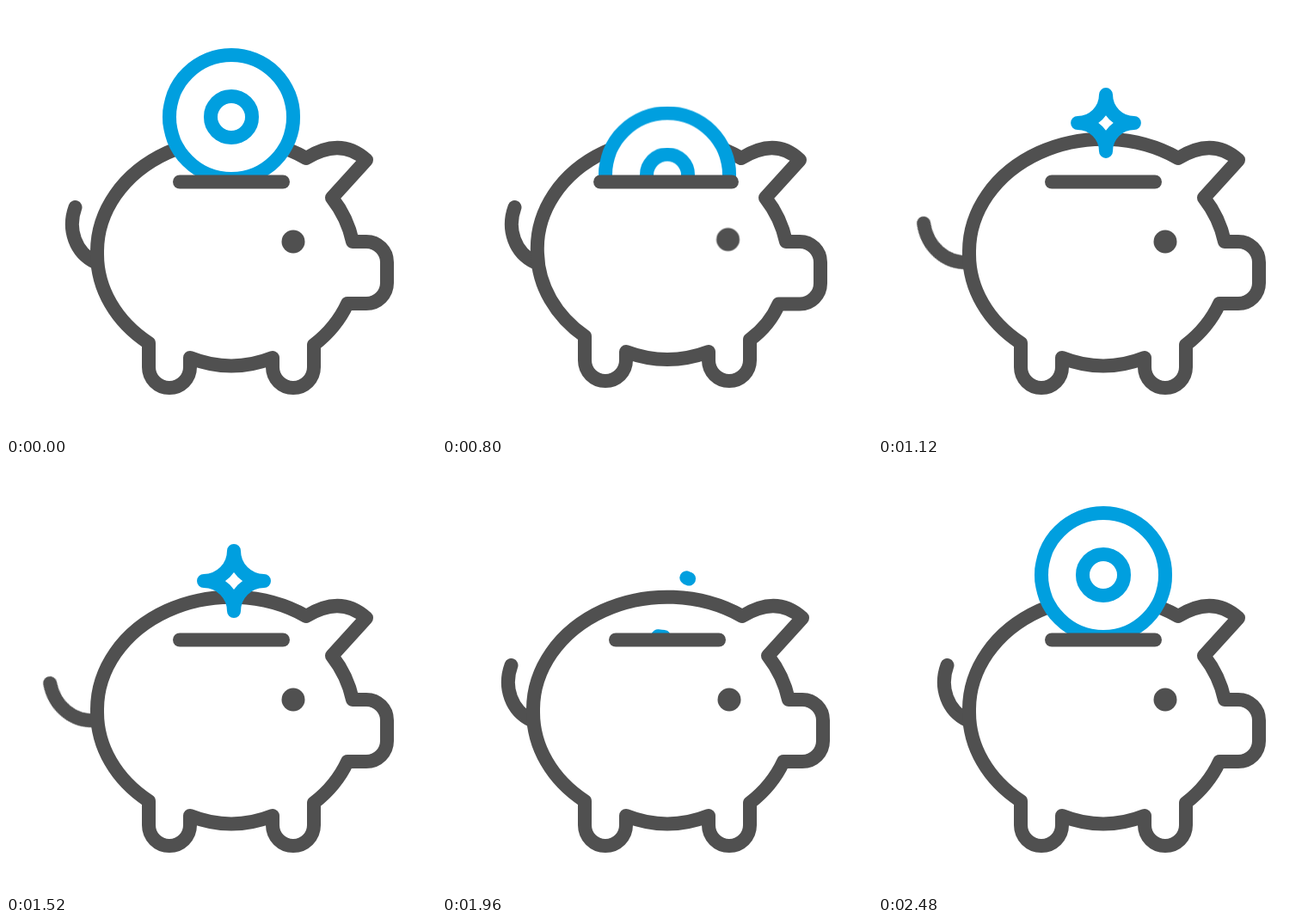
Animation of 500 by 500 pixels, one loop 3000 ms. Source, as an HTML page without scripts:

```html
<!DOCTYPE html>
<html lang="en">
<head>
<meta charset="utf-8">
<title>Piggy bank</title>
<style>
  html, body { margin: 0; width: 100%; height: 100%; overflow: hidden; background: #fff; }
  svg { display: block; width: 100vw; height: 100vh; }

  .line { fill: none; stroke: #505050; stroke-width: 16; stroke-linecap: round; stroke-linejoin: round; }
  .blue { fill: none; stroke: #009fdf; stroke-width: 16; stroke-linecap: round; stroke-linejoin: round; }
  .line, .blue, .eye, .move { animation: 3s ease-in-out infinite; }

  .body  { animation-name: gulp; }
  .slot  { animation-name: widen; }
  .eye   { fill: #505050; animation-name: eye; }
  .tail-shift { animation-name: tail-shift; }
  .tail  { transform-origin: 104px 298px; animation-name: wag; }
  .coin  { animation-name: drop; }
  .fill  { animation-name: fill; }
  .rim   { animation-name: draw-rim; }
  .hub   { animation-name: draw-hub; }
  .spark { animation-name: spark; }

  @keyframes gulp {
    0%, 21%, 36.5%, 100% {
      d: path("M358 394Q384 374 397 346H419A24 24 0 0 0 443 322V298A24 24 0 0 0 419 274H403Q397 246 379 223L419 179Q389 152 349 177A156 131 0 0 0 106 288A156 131 0 0 0 166 392V420A24 24 0 0 0 214 420V409Q262 428 310 409V420A24 24 0 0 0 358 420Z");
    }
    27%, 28% {
      d: path("M358 388Q381 371 391.5 346.5H416A24 24 0 0 0 440 322.5V298A24 24 0 0 0 416 274H400Q394 246 376 223L416 179Q388 152 348 177A151 128 0 0 0 111 288A151 128 0 0 0 166 384V412A24 24 0 0 0 214 412V402Q262 420 310 402V412A24 24 0 0 0 358 412Z");
    }
  }
  @keyframes widen {
    0%, 21%, 36.5%, 100% { d: path("M202 204.5H322"); }
    27%, 28% { d: path("M184 204.5H337"); }
  }
  @keyframes eye {
    0%, 21%, 36.5%, 100% { transform: none; }
    27%, 28% { transform: translate(-1.5px, -2.5px); }
  }
  @keyframes tail-shift {
    0%, 21%, 36.5%, 100% { transform: none; }
    27%, 28% { transform: translate(4px, 0); }
  }
  @keyframes wag {
    0%, 31.3% { transform: rotate(0deg); }
    39.3%, 48% { transform: rotate(-32deg); animation-timing-function: ease-in; }
    57.3% { transform: rotate(-21deg); animation-timing-function: ease-out; }
    65%, 100% { transform: rotate(0deg); }
  }
  @keyframes drop {
    0%, 19.2% { transform: none; }
    35.7% { transform: translate(0, 160px); }
    36%, 100% { transform: none; }
  }
  @keyframes fill {
    0%, 35.7% { transform: none; }
    35.71%, 65.3% { transform: translate(0, 148px); animation-timing-function: linear; }
    76% { transform: translate(0, 72px); animation-timing-function: ease-out; }
    82.6%, 100% { transform: none; }
  }
  /* Both ends of each stroke travel from the bottom to meet at the top. */
  @keyframes draw-rim {
    0%, 35.7% { opacity: 1; stroke-dasharray: 100 100; stroke-dashoffset: 0; }
    35.71%, 64.5% { opacity: 0; stroke-dasharray: 0 100; stroke-dashoffset: -51.6; }
    64.51% { opacity: 1; stroke-dasharray: 0 100; stroke-dashoffset: -51.6; animation-timing-function: linear; }
    65.33% { opacity: 1; stroke-dasharray: 1.5 100; stroke-dashoffset: -50.9; animation-timing-function: ease-in; }
    76% { opacity: 1; stroke-dasharray: 52 100; stroke-dashoffset: -20; animation-timing-function: ease-out; }
    82.6%, 100% { opacity: 1; stroke-dasharray: 100 100; stroke-dashoffset: 0; }
  }
  @keyframes draw-hub {
    0%, 35.7% { opacity: 1; stroke-dasharray: 100 100; stroke-dashoffset: 0; }
    35.71%, 68% { opacity: 0; stroke-dasharray: 0 100; stroke-dashoffset: -50; }
    68.01% { opacity: 1; stroke-dasharray: 0 100; stroke-dashoffset: -50; }
    82%, 100% { opacity: 1; stroke-dasharray: 100 100; stroke-dashoffset: 0; }
  }
  @keyframes spark {
    0%, 32% {
      opacity: 0; stroke-dasharray: 100 100; stroke-dashoffset: 0;
      d: path("M264 136A1 1 0 0 1 265 137A1 1 0 0 1 266 136A1 1 0 0 1 265 135A1 1 0 0 1 264 136Z");
    }
    32.01% {
      opacity: 1; stroke-dasharray: 100 100; stroke-dashoffset: 0;
      d: path("M264 136A1 1 0 0 1 265 137A1 1 0 0 1 266 136A1 1 0 0 1 265 135A1 1 0 0 1 264 136Z");
      animation-timing-function: ease-out;
    }
    38.7%, 51% {
      opacity: 1; stroke-dasharray: 100 100; stroke-dashoffset: 0;
      d: path("M230 136A35 35 0 0 1 265 171A35 35 0 0 1 300 136A35 35 0 0 1 265 101A35 35 0 0 1 230 136Z");
    }
    65.33%, 66.2% {
      opacity: 1; stroke-dasharray: 1.4 100; stroke-dashoffset: -56;
      d: path("M230 136A35 35 0 0 1 265 171A35 35 0 0 1 300 136A35 35 0 0 1 265 101A35 35 0 0 1 230 136Z");
    }
    66.21%, 100% {
      opacity: 0; stroke-dasharray: 1.4 100; stroke-dashoffset: -56;
      d: path("M230 136A35 35 0 0 1 265 171A35 35 0 0 1 300 136A35 35 0 0 1 265 101A35 35 0 0 1 230 136Z");
    }
  }
</style>
</head>
<body>
<svg viewBox="0 0 500 500">
  <defs>
    <clipPath id="above-slot"><rect width="500" height="205"/></clipPath>
    <clipPath id="disc"><circle cx="262" cy="129" r="72"/></clipPath>
  </defs>

  <g class="move tail-shift"><path class="line tail" d="M80.5 234C71 260 81 287 104 298"/></g>
  <path class="line body"/>
  <circle class="eye" cx="334" cy="274" r="13.5"/>

  <g clip-path="url(#above-slot)">
    <g class="move coin">
      <g clip-path="url(#disc)"><rect class="move fill" x="190" y="57" width="144" height="148" fill="#fff"/></g>
      <g transform="rotate(-90 262 129)">
        <circle class="blue rim" cx="262" cy="129" r="72" pathLength="100"/>
        <circle class="blue hub" cx="262" cy="129" r="24" pathLength="100"/>
      </g>
    </g>
  </g>

  <path class="line slot"/>
  <path class="blue spark" pathLength="100"/>
</svg>
</body>
</html>
```
